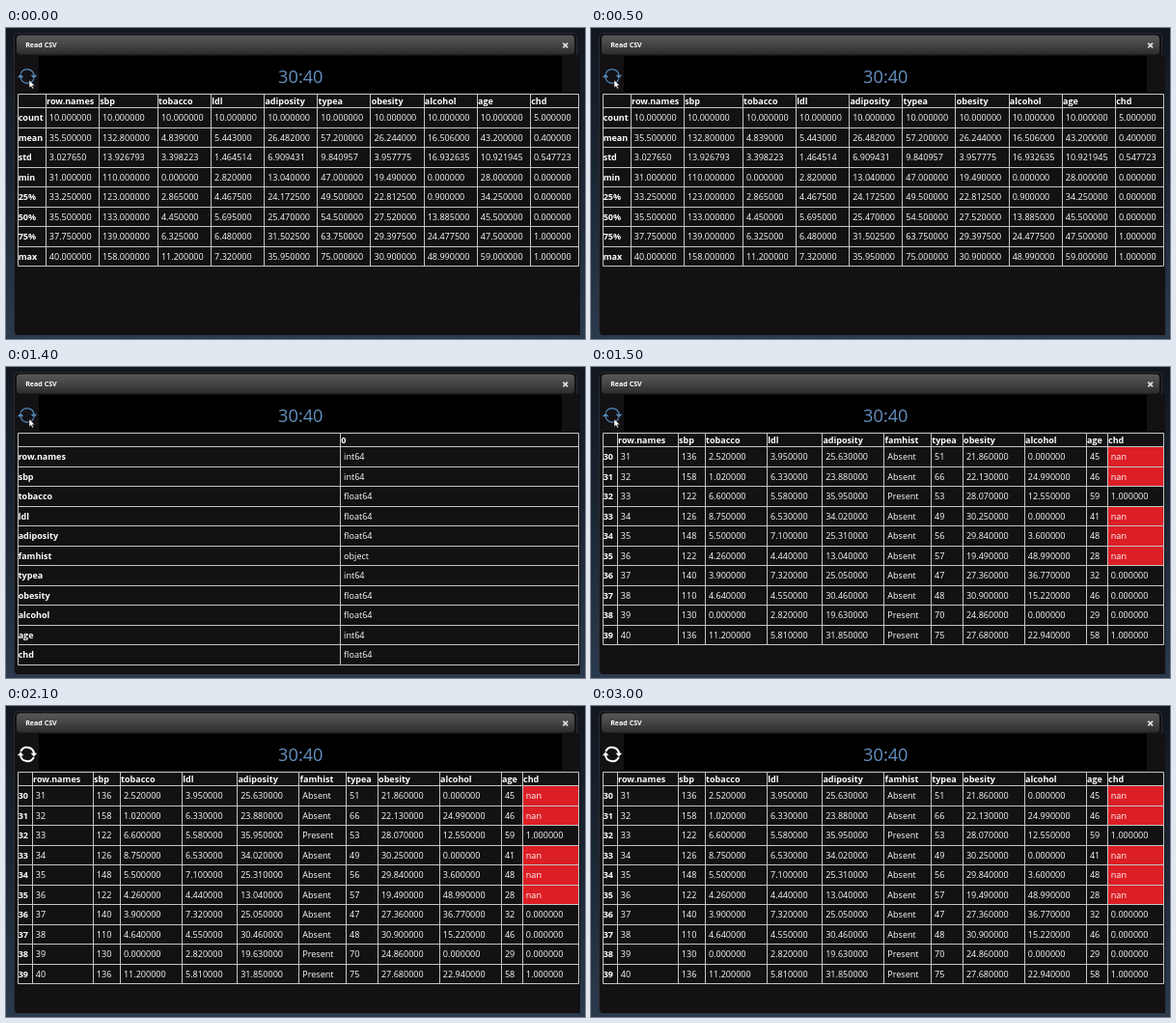
An HTML page for the animation above (3.1 s loop, 600 px wide and 322 px high).

```html
<!DOCTYPE html>
<html lang="en">
<head>
<meta charset="utf-8">
<title>Read CSV</title>
<style>
html, body { margin: 0; width: 100%; height: 100%; overflow: hidden; background: #131720; }
svg { display: block; width: 100vw; height: 100vh; }
text { font-family: "Open Sans", "Noto Sans", sans-serif; fill: #fff; font-size: 9.05px; font-weight: 500; }
.b { font-weight: 700; font-size: 9px; }
.grid { stroke: #c4c4c4; fill: none; }
</style>
</head>
<body>
<svg viewBox="0 0 600 322">
  <defs>
    <linearGradient id="back" x2="0" y2="1">
      <stop offset="0" stop-color="#121720"/><stop offset=".45" stop-color="#1a2532"/><stop offset="1" stop-color="#2b3a4d"/>
    </linearGradient>
    <linearGradient id="bar" x2="0" y2="1">
      <stop offset="0" stop-color="#595757"/><stop offset=".5" stop-color="#454343"/><stop offset="1" stop-color="#2d2b2c"/>
    </linearGradient>
  </defs>
  <rect width="600" height="322" fill="url(#back)"/>
  <rect x="8.5" y="5.5" width="583" height="312" rx="4" fill="#131114" stroke="#303238" stroke-width=".8"/>
  <rect x="10" y="28" width="585" height="290" fill="#131114"/>
  <rect x="11" y="7.5" width="578" height="20" rx="4" fill="url(#bar)"/>
  <text class="b" x="20.2" y="20.3" style="font-size:7.1px">Read CSV</text>
  <path d="M577.3 15.6l4.8 4.8m0-4.8l-4.8 4.8" stroke="#dedede" stroke-width="1.7"/>
  <rect x="34" y="29" width="542" height="38" fill="#000"/>
  <text x="305.3" y="56.5" text-anchor="middle" style="font-size:18.2px;fill:#6590c0;font-weight:400">30:40</text>
  <g id="icon">
    <path id="arcs" d="M15.2 47.2A7.2 7.2 0 0 1 29 49.5M28.8 52.8A7.2 7.2 0 0 1 15 50.5" fill="none"/>
    <path d="M25.6 48.8h6.6l-3.3 3.8zM11.8 51.2h6.6l-3.3-3.8z"/>
  </g>
  <g id="tables"></g>
  <path id="cursor" d="M24 53.8v8.2l1.9-1.7 1.3 2.8 1.4-.7-1.3-2.7h2.6z" fill="#fff" stroke="#000" stroke-width=".5"/>
</svg>
<script>
const LEFT = 12.5, RIGHT = 593.5, TOP = 68.5, HEAD = 82.8, ROW = 20.5;
const $ = id => document.getElementById(id);
const range = n => [...Array(n).keys()];
const sum = a => a.reduce((s, v) => s + v, 0);
const mean = a => sum(a) / a.length;
const fixed = v => v.toFixed(6);
const snap = v => Math.floor(v) + .5;
const list = s => s.split(' ').map(Number);

// The visible data set; the type list and the statistics are worked out from it.
const data = {
  'row.names': range(10).map(i => 31 + i),
  sbp: list('136 158 122 126 148 122 140 110 130 136'),
  tobacco: list('2.52 1.02 6.6 8.75 5.5 4.26 3.9 4.64 0 11.2'),
  ldl: list('3.95 6.33 5.58 6.53 7.1 4.44 7.32 4.55 2.82 5.81'),
  adiposity: list('25.63 23.88 35.95 34.02 25.31 13.04 25.05 30.46 19.63 31.85'),
  famhist: [...'AAPAAAAAPP'].map(c => c === 'P' ? 'Present' : 'Absent'),
  typea: list('51 66 53 49 56 57 47 48 70 75'),
  obesity: list('21.86 22.13 28.07 30.25 29.84 19.49 27.36 30.9 24.86 27.68'),
  alcohol: list('0 24.99 12.55 0 3.6 48.99 36.77 15.22 0 22.94'),
  age: list('45 46 59 41 48 28 32 46 29 58'),
  chd: list('nan nan 1 nan nan nan 0 0 0 1')
};
const names = Object.keys(data);
const numeric = names.filter(n => n !== 'famhist');

const typeOf = col => typeof col[0] === 'string' ? 'object'
  : col.every(Number.isInteger) ? 'int64' : 'float64';

const show = (v, type) => type !== 'float64' ? v : Number.isNaN(v) ? 'nan' : fixed(v);

function std(a) {
  const m = mean(a);
  return Math.sqrt(sum(a.map(v => (v - m) ** 2)) / (a.length - 1));
}

function quantile(a, q) {
  const s = [...a].sort((x, y) => x - y);
  const p = q * (s.length - 1), i = Math.floor(p);
  return s[i] + (p - i) * ((s[i + 1] ?? s[i]) - s[i]);
}

const stats = {
  count: a => a.length, mean, std,
  min: a => Math.min(...a),
  '25%': a => quantile(a, .25),
  '50%': a => quantile(a, .5),
  '75%': a => quantile(a, .75),
  max: a => Math.max(...a)
};

const valid = numeric.map(n => data[n].filter(v => !Number.isNaN(v)));
const summary = Object.entries(stats).map(([k, f]) => [k, ...valid.map(a => fixed(f(a)))]);
const types = names.map(n => [n, typeOf(data[n])]);
const records = range(10).map(i => [30 + i, ...names.map(n => show(data[n][i], typeOf(data[n])))]);

const edges = (x, widths) => widths.reduce((e, w) => [...e, e[e.length - 1] + w], [x]);
const label = (x, y, s, bold) => `<text x="${x}" y="${y}"${bold ? ' class="b"' : ''}>${s}</text>`;

function table(cols, heads, rows) {
  const xs = cols.map(snap);
  const bottom = snap(HEAD + rows.length * ROW);
  let fills = '', texts = '', lines = `M${LEFT} ${TOP}H${RIGHT}M${LEFT} ${bottom}H${RIGHT}`;
  heads.forEach((h, i) => texts += label(cols[i] + .8, 79.3, h, true));
  rows.forEach((row, r) => {
    const y = snap(HEAD + r * ROW);
    lines += `M${LEFT} ${y}H${RIGHT}`;
    row.forEach((cell, c) => {
      if (cell === 'nan') fills += `<rect x="${xs[c - 1]}" y="${y}" width="${RIGHT - xs[c - 1]}" height="${ROW}" fill="#dc1e25"/>`;
      texts += label(c ? cols[c - 1] + 3.6 : LEFT + .2, HEAD + r * ROW + 13.6, cell, !c);
    });
  });
  [LEFT, ...xs, RIGHT].forEach(x => lines += `M${x} ${TOP}V${bottom}`);
  return `<g>${fills}<path class="grid" d="${lines}"/>${texts}</g>`;
}

// Summary columns grow with their longest number.
const widest = c => Math.max(...summary.map(r => r[c + 1].length));
const statWidths = numeric.slice(0, -1).map((n, c) => 55.15 + 5.8 * (widest(c) - 9));

$('tables').innerHTML =
  table(edges(41.2, statWidths), numeric, summary) +
  table([346.5], ['0'], types) +
  table(edges(27.2, [63, 28.1, 64.1, 57.2, 64.1, 48.8, 32.8, 63.9, 64.1, 21.9]), names, records);
const views = [...$('tables').children];

function draw(ms) {
  const t = ms % 3100;
  const shown = t < 600 ? 0 : t < 1500 ? 1 : 2;
  views.forEach((v, i) => v.setAttribute('visibility', i === shown ? 'visible' : 'hidden'));
  const hover = t < 1900;
  const color = hover ? '#5288b8' : '#fff';
  $('icon').setAttribute('fill', color);
  $('arcs').setAttribute('stroke', color);
  $('arcs').setAttribute('stroke-width', hover ? 1.2 : 2);
  $('cursor').setAttribute('visibility', hover ? 'visible' : 'hidden');
}

const start = performance.now();
function tick() {
  draw(performance.now() - start);
  requestAnimationFrame(tick);
}
draw(0);
requestAnimationFrame(tick);
</script>
</body>
</html>
```
